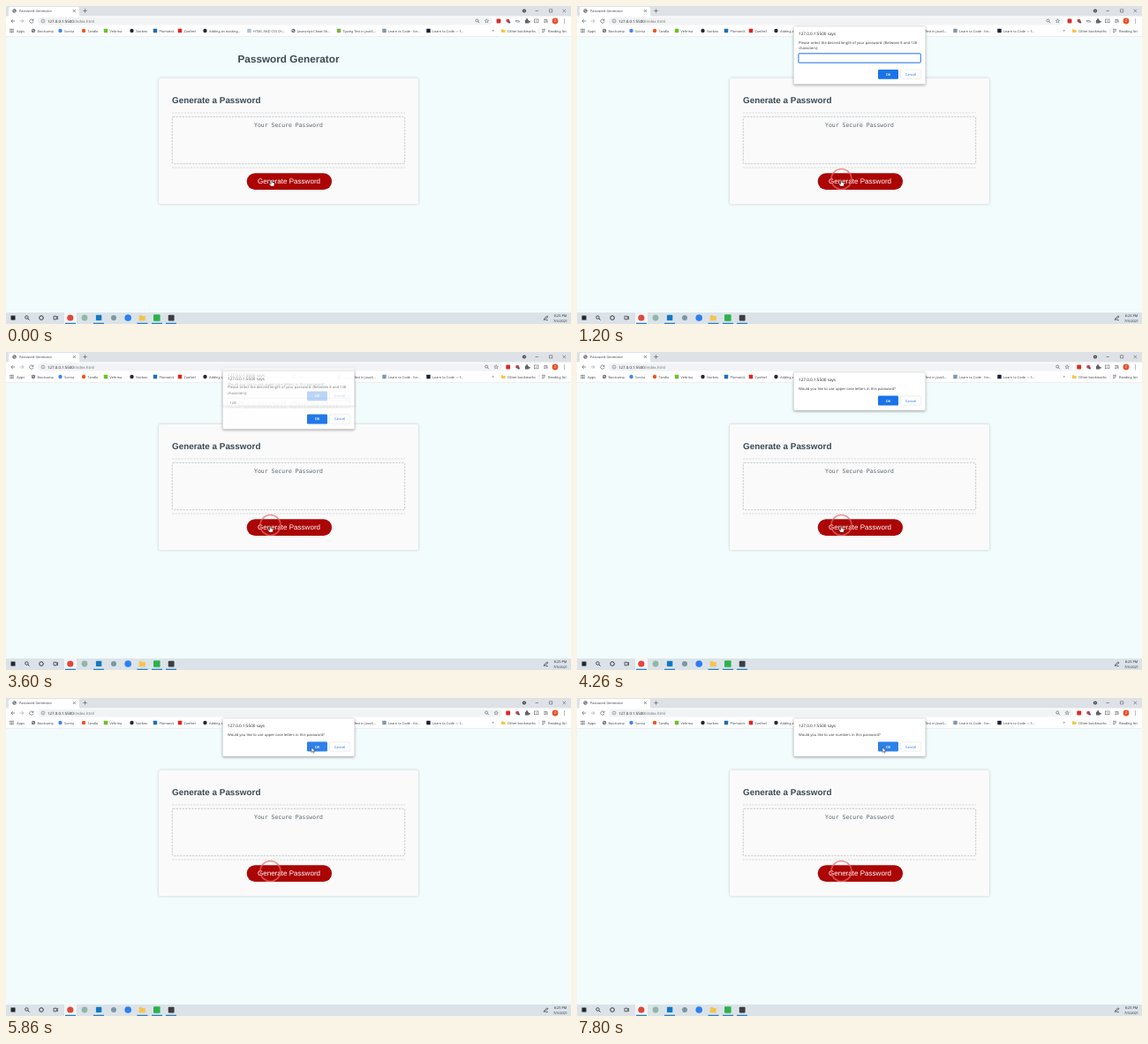
Write an HTML page that moves like this. It is 640 px wide and 360 px high and loops after 8000 ms.

```html
<!DOCTYPE html>
<html lang="en">
<head>
<meta charset="utf-8">
<title>Password Generator</title>
<style>
html, body { margin: 0; width: 100%; height: 100%; overflow: hidden; background: #f3fcfc; }
svg { display: block; width: 100vw; height: 100vh; }
text { font-family: "Open Sans", "Noto Sans", sans-serif; text-rendering: geometricPrecision; white-space: pre; }
.page text { font-family: "Liberation Sans", Arial, sans-serif; }
.page .mono { font-family: "DejaVu Sans Mono", monospace; }
.dialog { filter: drop-shadow(0 1px 1.5px rgba(0, 0, 0, .35)); }
</style>
</head>
<body>
<svg id="stage" viewBox="0 0 640 360" xmlns="http://www.w3.org/2000/svg"></svg>
<script>
const LOOP = 8000;
const BLUE = '#1a73e8', INK = '#3c4043', GREY = '#5f6368', SLATE = '#3b4a54';
const stage = document.getElementById('stage');

const rect = (x, y, w, h, fill, more = '') =>
  `<rect x="${x}" y="${y}" width="${w}" height="${h}" fill="${fill}" ${more}/>`;
const dot = (x, y, r, fill, more = '') =>
  `<circle cx="${x}" cy="${y}" r="${r}" fill="${fill}" ${more}/>`;
const text = (x, y, size, str, fill = INK, more = '') =>
  `<text x="${x}" y="${y}" font-size="${size}" fill="${fill}" ${more}>${str}</text>`;
const line = (d, color = GREY, width = .7, more = '') =>
  `<path d="${d}" fill="none" stroke="${color}" stroke-width="${width}" ${more}/>`;
const MID = 'text-anchor="middle"';

function globe(x, y) {
  return dot(x, y, 2.2, '#6a6f74') + line(`M${x - 1.5} ${y - .6}h2M${x - .4} ${y + .8}h1.8`, '#fff', .6);
}

function magnifier(x, y, color, s = 1) {
  return `<g transform="translate(${x} ${y}) scale(${s})">` +
    dot(-.5, -.5, 1.5, 'none', `stroke="${color}" stroke-width=".7"`) +
    line('M.6 .6L2.2 2.2', color, .8) + '</g>';
}

function star(x, y) {
  let d = '';
  for (let i = 0; i < 10; i++) {
    const a = i * Math.PI / 5, r = i % 2 ? 1 : 2.4;
    d += `${i ? 'L' : 'M'}${(x + r * Math.sin(a)).toFixed(2)} ${(y - r * Math.cos(a)).toFixed(2)}`;
  }
  return line(d + 'Z', GREY, .5);
}

function bookmarks() {
  let out = '';
  const apps = ['#ea4335', '#34a853', '#4285f4'];
  for (let i = 0; i < 9; i++)
    out += rect(4.3 + (i % 3) * 1.6, 25.8 + Math.floor(i / 3) * 1.6, 1.2, 1.2, apps[(i + Math.floor(i / 3)) % 3]);
  out += text(12, 29.5, 3.9, 'Apps');
  // icon x, label, icon shape, colour
  [
    [31, 'Bootcamp', 'globe'],
    [61.5, 'Sorvia', 'dot', '#4285f4'],
    [88, 'Tandlo', 'dot', '#f4511e'],
    [113, 'Veltrina', 'box', '#6cc02a'],
    [142.5, 'Norbex', 'dot', '#24292e'],
    [169, 'Plomwick', 'box', '#1c6fb5'],
    [197, 'Zanfeel', 'box', '#e8211c'],
    [225.5, 'Adding an existing…', 'dot', '#24292e'],
    [275.5, 'HTML AND CSS Ch…', 'box', '#a9c3dd'],
    [325.5, 'Javascript-Cheat-Sh…', 'globe'],
    [377, 'Typing Test in JavaS…', 'box', '#7cb342'],
    [428.5, 'Learn to Code - for…', 'box', '#7d98b0'],
    [478.5, 'Learn to Code — f…', 'box', '#1b2038']
  ].forEach(([x, label, kind, fill]) => {
    out += kind === 'globe' ? globe(x, 28)
      : kind === 'dot' ? dot(x, 28, 2.2, fill)
      : rect(x - 2.2, 25.8, 4.4, 4.4, fill, 'rx=".5"');
    out += text(x + 4.6, 29.5, 3.8, label);
  });
  out += text(550.5, 29.4, 4.6, '»');
  out += '<path d="M561 26.2h1.8l.6.7h2.2v3.2h-4.6z" fill="#f3c74f"/>';
  out += text(568, 29.5, 3.9, 'Other bookmarks') + line('M604 25v6', '#c8ccd0', .5);
  out += line('M607 26.3h4M607 28h4M607 29.7h2.4') + text(614, 29.5, 3.9, 'Reading list');
  return out;
}

function browser() {
  return rect(0, 0, 640, 12, '#dee1e6') +
    '<path d="M1 12q2 0 2-2V3q0-2 2-2h76q2 0 2 2v7q0 2 2 2z" fill="#fff"/>' +
    globe(9.5, 5.5) + text(15, 7, 3.9, 'Password Generator') +
    line('M75.8 4l3 3m0-3l-3 3') + line('M89.5 3.2v4.6M87.2 5.5h4.6') +
    dot(587, 5.5, 2.1, '#45494d') + line('M586 5l1 1 1-1', '#fff', .5) +
    line('M599.5 5.5h3.6M615.5 3.8h3.2v3.2h-3.2zM630.6 3.8l3.4 3.4m0-3.4l-3.4 3.4', INK, .5) +
    rect(0, 11.5, 640, 23, '#fff') + rect(0, 34.3, 640, .5, '#dfe3e6') +
    line('M10.2 17H5.8m2-2l-2 2 2 2') + line('M15.5 17h4.4m-2-2l2 2-2 2', '#a9adb1') +
    line('M30.5 15.8a2.1 2.1 0 1 0 .4 1.8M31 14.6v1.7h-1.7') +
    rect(36, 12.8, 526, 8.6, '#f1f3f4', 'rx="4.3" id="omnibox"') +
    dot(42, 17, 2, 'none', `stroke="${GREY}" stroke-width=".5"`) + line('M42 16.7v1.4M42 15.6v.5', GREY, .5) +
    text(47, 18.6, 4.4, '127.0.0.1:5500<tspan fill="#6d7276">/index.html</tspan>', '#202124') +
    '<g id="tools">' + magnifier(534, 17, GREY) + star(544.5, 17) +
      rect(555.6, 14.6, 4.8, 4.8, '#d92b2b', 'rx="1"') +
      dot(568.5, 16.7, 2, '#cf3c46') + rect(569, 17.4, 2.2, 2, '#3b5a92') + '</g>' +
    '<g id="extra">' + line('M577 16.4h3.8l1.2 1.6h-4z', '#747a80', .7) + '</g>' +
    '<path d="M588 15.7h1.3a1 1 0 1 1 1.6 0h1.2v1.3a1 1 0 1 1 0 1.4v1.2H588z" fill="#5f6368"/>' +
    rect(598.6, 15, 4.4, 3.8, 'none', `stroke="${GREY}" stroke-width=".6"`) +
    line('M600.8 16.4v1.2', GREY, .8) +
    line('M609.3 15.4h4M609.3 17h4M609.3 18.6h2.3M613 16.6v2.6') +
    dot(622, 17, 3.4, '#e8502a') + text(622, 18.4, 3.9, 'Z', '#fff', MID) +
    [15, 17, 19].map(y => dot(632.5, y, .55, GREY)).join('') + bookmarks();
}

function page() {
  const rule = y => line(`M188 ${y}H452`, '#bcc1c4', .6, 'stroke-dasharray="2.2 1.3"');
  return '<g class="page">' +
    text(320, 64, 11.76, 'Password Generator', SLATE, MID + ' font-weight="700"') +
    rect(173, 81.7, 294, 142.6, '#fafafa', 'rx="1.8" style="filter:drop-shadow(0 .8px 1.6px rgba(0,0,0,.22))"') +
    text(188, 110, 9.88, 'Generate a Password', SLATE, 'font-weight="700"') +
    rule(121) + rule(183) +
    rect(188.3, 125.3, 263.4, 53.4, '#fafafa', 'rx="1" stroke="#aeb3b6" stroke-width=".7" stroke-dasharray="2.2 1.3"') +
    text(320, 137.2, 6.47, 'Your Secure Password', '#5c666d', MID + ' class="mono"') +
    rect(272.7, 189.3, 96.4, 18.6, '#ab0505', 'rx="9.3"') +
    text(320.5, 201, 8.05, 'Generate Password', '#fff', MID) + '</g>';
}

function taskbar() {
  const y = 353, u = x => rect(x - 6, 358.7, 12, 1.3, '#2c83c8');
  return rect(0, 347, 640, 13, '#dbe3e9') +
    rect(66, 347, 14, 13, '#f2f6f8') +
    rect(5.5, 350.5, 5, 5, '#23282c') + magnifier(24, y, '#23282c', 1.15) +
    dot(40, y, 2.3, 'none', 'stroke="#23282c" stroke-width=".9"') +
    line('M54 351.2h3.2v3.6H54zM58.4 351v4', '#23282c', .7) +
    dot(72.8, y, 3.6, '#e0483a') +
    dot(89, y, 3.4, '#8fb8a6') +
    rect(101.9, 349.7, 6.4, 6.4, '#1379c4', 'rx=".8"') +
    dot(122, y, 3, '#7a98a2') +
    dot(138.2, y, 3.8, '#2d7ff0') +
    '<path d="M150.8 350h2.6l.8 1h3.6v5.2h-7z" fill="#f4c44c"/>' +
    rect(167, 349.2, 7.6, 7.6, '#2db24a', 'rx="1"') +
    rect(183.8, 349.7, 6.8, 6.8, '#3d3d3d', 'rx="1"') +
    [73, 105, 154.5, 171, 187].map(u).join('') +
    line('M609.3 355.3l.6-1.5 3-3 1 1-3 3zM611.5 355.6h2.3', '#23282c', .7) +
    text(628, 352, 3.9, '8:25 PM', '#23282c', MID) + text(628, 357.6, 3.9, '7/5/2021', '#23282c', MID);
}

function dialog(id, lines, prompt) {
  const top = prompt ? 72 : 49.6;
  return `<g id="${id}" class="dialog">` +
    rect(245.4, 23, 149.4, prompt ? 65.6 : 43, '#fff', 'rx="1.2" stroke="#c9cdd0" stroke-width=".4"') +
    text(251, 33.2, 4.65, '127.0.0.1:5500 says', '#202124') +
    lines.map((s, i) => text(251, 42.7 + i * 6.4, 4.1, s, '#34383c')).join('') +
    (prompt ? rect(250.9, 53.8, 138.4, 10.4, '#fff', 'rx="1" class="field"') +
      text(253.5, 60.5, 4.1, '', '#34383c', 'class="value"') +
      rect(253, 56.4, .5, 5.2, '#202124', 'class="caret"') : '') +
    rect(341, top, 23, 10.8, BLUE, 'rx="1.2" class="ok"') +
    text(352.5, top + 6.9, 4, 'OK', '#fff', MID + ' font-weight="600"') +
    rect(366.6, top + .2, 22.6, 10.4, '#fff', 'rx="1.2" stroke="#dadce0" stroke-width=".5"') +
    text(378, top + 6.9, 4, 'Cancel', BLUE, MID) + '</g>';
}

const ask = kind => [`Would you like to use ${kind} in this password?`];
// id, lines, opening and closing times
const dialogs = [
  ['length', ['Please select the desired length of your password. (Between 8 and 128', 'characters):'], 560, 3530],
  ['upper', ask('upper case letters'), 3575, 5930],
  ['lower', ask('lower case letters'), 5975, 7130],
  ['digits', ask('numbers'), 7175, Infinity]
];

stage.innerHTML = rect(0, 0, 640, 360, '#f3fcfc') + page() + browser() + taskbar() +
  dot(299.5, 196, 0, 'none', 'id="ring" stroke="#e8696c" stroke-width="1.6" opacity=".75"') +
  dialogs.map(([id, lines], i) => dialog(id, lines, i === 0)).join('') +
  '<path id="hand" d="M-.6 0q.7-.6 1.2 0v2.5l2.2.7q.7.3.6 1l-.5 2.8H-.8L-2.6 4.6q.2-1 1.1-.5l.9.6z" fill="#fff" stroke="#222" stroke-width=".45"/>' +
  '<path id="arrow" d="M0 0V5.8L1.4 4.5 2.3 6.6 3.2 6.2 2.3 4.2H4.1Z" fill="#fff" stroke="#222" stroke-width=".45"/>';

const find = s => stage.querySelector(s);
const clamp = v => Math.max(0, Math.min(1, v));
const part = (t, from, to) => clamp((t - from) / (to - from));
const smooth = p => p * p * (3 - 2 * p);
const outCubic = p => 1 - (1 - p) ** 3;
const set = (el, attrs) => { for (const k in attrs) el.setAttribute(k, attrs[k]); };
const move = (el, x, y) => el.setAttribute('transform', `translate(${x} ${y})`);
const KEYS = [1530, 1800, 1990];

function pointer(t) {
  const nudge = smooth(part(t, 60, 300)), go = smooth(part(t, 4460, 5030)), drift = smooth(part(t, 5060, 5260));
  return [300.7 - 1.5 * nudge + 43.8 * go + 3 * drift, 197 - 142 * go + .8 * drift];
}

function drawField(t) {
  const typed = KEYS.filter(k => t >= k).length;
  const since = t - (typed ? KEYS[typed - 1] : 600);
  const focused = t < 3530;
  set(find('.field'), { stroke: focused ? BLUE : '#e0e3e6', 'stroke-width': focused ? 1 : .4 });
  find('.value').textContent = '128'.slice(0, typed);
  set(find('.caret'), {
    x: 253.3 + typed * 2.35,
    opacity: focused && Math.floor(Math.max(0, since) / 530) % 2 === 0 ? 1 : 0
  });
}

function draw(t) {
  const [x, y] = pointer(t);
  const hover = x > 341 && x < 364 && y > 49 && y < 61;

  for (const [id, , from, to] of dialogs) {
    const el = find('#' + id), open = part(t, from, from + 260);
    const shut = to === Infinity ? 0 : part(t, to, to + 200);
    const shown = t >= from && shut < 1;
    el.style.display = shown ? '' : 'none';
    if (!shown) continue;
    move(el, 0, -7 * (1 - outCubic(open)) - 4 * shut);
    el.setAttribute('opacity', Math.min(1, open * 3) * (1 - shut ** 3));
    el.querySelector('.ok').setAttribute('fill', hover && id !== 'length' ? '#2d80ea' : BLUE);
  }
  drawField(t);

  const ring = outCubic(part(t, 400, 550));
  set(find('#ring'), { r: 11.5 * ring, visibility: ring ? 'visible' : 'hidden' });

  const slim = t >= 3200;
  move(find('#tools'), slim ? 10.7 : 0, 0);
  find('#extra').style.display = slim ? 'none' : '';
  set(find('#omnibox'), { width: slim ? 526 : 515 });

  const hand = t < 4520;
  find('#hand').style.display = hand ? '' : 'none';
  find('#arrow').style.display = hand ? 'none' : '';
  move(find(hand ? '#hand' : '#arrow'), x, y);
}

let start;
function tick(now) {
  start ??= now;
  draw((now - start) % LOOP);
  requestAnimationFrame(tick);
}
draw(0);
requestAnimationFrame(tick);
</script>
</body>
</html>
```
